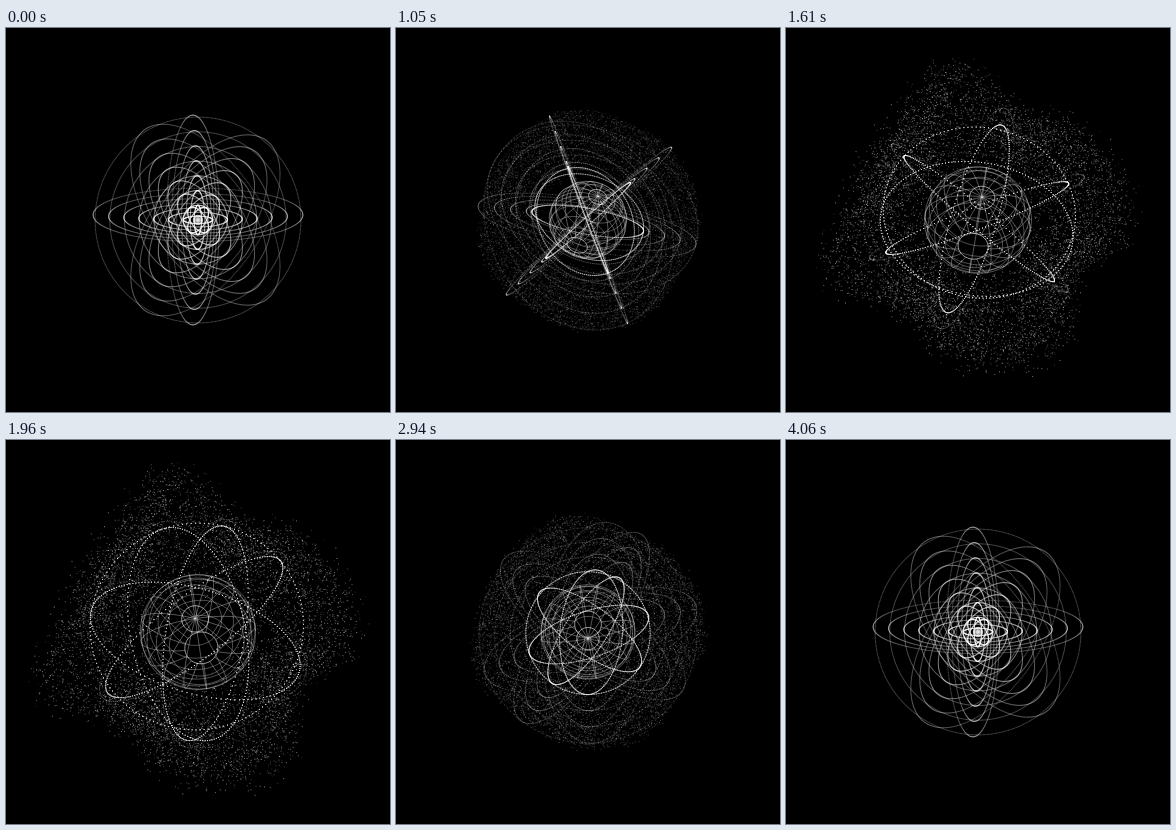
Animation, 384 px wide and 384 px high, one loop 4200 ms. Source, as an HTML page with a canvas:

```html
<!DOCTYPE html>
<html lang="en">
<head>
<meta charset="utf-8">
<title>Expanding orbits</title>
<style>
  html, body { margin: 0; width: 100%; height: 100%; background: #000; overflow: hidden; }
  canvas { display: block; width: 100vw; height: 100vh; }
</style>
</head>
<body>
<canvas id="stage" width="384" height="384"></canvas>
<script>
const ctx = document.getElementById('stage').getContext('2d');
const LOOP = 4200, STEP = 70, END = 4060;
const C = 192, CAMERA = 520, TAU = Math.PI * 2, RAD = Math.PI / 180;
const LEVELS = 7, GAP = 14.7, DOTS = 480, GLOW = .3;

// Pose keys: time, yaw, pitch, spin (degrees)
const KEYS = [
  [0, 0, 0, 360], [1050, -16, 42, 308], [1610, -5, 28, 278], [2380, 10, 0, 88],
  [2940, 0, -9, 35], [3500, 25, 0, 14], [END, 0, 0, 0]
];

// Normals of the great circles
const NORMALS = [[0, 0, 1], [0, .97, .25], [.97, 0, .25], [-.7, .5, .5], [-.7, -.5, .5]];

function ringPoints([nx, ny, nz]) {
  const flat = Math.hypot(nx, ny), len = Math.hypot(flat, nz);
  const u = flat ? [-ny / flat, nx / flat, 0] : [1, 0, 0];
  const n = [nx / len, ny / len, nz / len];
  const v = [n[1] * u[2] - n[2] * u[1], n[2] * u[0] - n[0] * u[2], n[0] * u[1] - n[1] * u[0]];
  return Array.from({ length: DOTS }, (_, i) => {
    const a = i / DOTS * TAU;
    return u.map((c, k) => c * Math.cos(a) + v[k] * Math.sin(a));
  });
}
const rings = NORMALS.map(ringPoints);

let seed = 7;
function random() {
  seed = (seed * 16807) % 2147483647;
  return seed / 2147483647;
}
const dust = Array.from({ length: 8000 }, () => {
  const angle = random() * TAU;
  const reach = 138 + 20 * Math.cos(4 * (angle + .26)) + 8 * Math.sin(7 * angle + 1);
  const u = Math.pow(random(), .62);
  return {
    angle,
    near: 45 + 58 * u,
    far: 55 + (reach - 55) * u + (random() + random() - 1) * 24,
    light: .12 + .38 * random()
  };
});

function slope(i, c) {
  if (i === 0 || i === KEYS.length - 1) return 0;
  return (KEYS[i + 1][c] - KEYS[i - 1][c]) / (KEYS[i + 1][0] - KEYS[i - 1][0]);
}

function pose(t, c) {
  let i = 0;
  while (i < KEYS.length - 2 && t > KEYS[i + 1][0]) i++;
  const a = KEYS[i], b = KEYS[i + 1], h = b[0] - a[0];
  const x = (t - a[0]) / h, y = 1 - x;
  return RAD * (a[c] * (1 + 2 * x) * y * y + b[c] * x * x * (3 - 2 * x)
    + h * x * y * (slope(i, c) * y - slope(i + 1, c) * x));
}

function makeProjector(t) {
  const [yaw, pitch, spin] = [1, 2, 3].map(c => pose(t, c));
  const ca = Math.cos(yaw), sa = Math.sin(yaw);
  const cb = Math.cos(pitch), sb = Math.sin(pitch);
  const cs = Math.cos(spin), ss = Math.sin(spin);
  return ([x, y, z], r) => {
    const x1 = x * cs - y * ss, y1 = x * ss + y * cs;
    const x2 = x1 * ca + z * sa, z2 = z * ca - x1 * sa;
    const y3 = y1 * cb + z2 * sb, z3 = z2 * cb - y1 * sb;
    const k = r * CAMERA / (CAMERA - z3 * r);
    return [C + x2 * k, C + y3 * k];
  };
}

function drawDust(s) {
  const show = Math.min(1, Math.max(0, (s - .3) / .5));
  if (!show) return;
  const spread = Math.min(1, Math.max(0, (s - .45) / .5));
  for (const d of dust) {
    const r = d.near + (d.far - d.near) * spread;
    ctx.globalAlpha = d.light * show;
    ctx.fillRect(C + r * Math.cos(d.angle), C + r * Math.sin(d.angle), 1, 1);
  }
}

function drawRings(project, s) {
  const minor = GLOW * Math.max(0, 1 - 1.3 * s);
  for (let k = 1; k <= LEVELS; k++) {
    // An expanding field pushes the inner shells outward
    const r = Math.max(k * GAP * (1 + .1 * s), 107 * s);
    for (const ring of rings) {
      for (let i = 0; i < DOTS; i++) {
        const alpha = i % 3 ? minor : GLOW;
        if (alpha < .01) continue;
        const [x, y] = project(ring[i], r);
        ctx.globalAlpha = alpha;
        ctx.fillRect(x - .5, y - .5, 1, 1);
      }
    }
  }
}

function drawSphere(project, r) {
  const at = (lat, lon) => project(
    [Math.sin(lat) * Math.cos(lon), Math.sin(lat) * Math.sin(lon), Math.cos(lat)], r);
  const curve = (n, alpha, point) => {
    ctx.globalAlpha = alpha;
    ctx.beginPath();
    for (let i = 0; i <= n; i++) ctx.lineTo(...point(i / n));
    ctx.stroke();
  };
  ctx.lineWidth = .8;
  const first = 15 * RAD;
  // The near cap stays open
  for (let i = 0; i < 16; i++) {
    curve(24, .42, q => at(first + q * (Math.PI - first), i / 16 * TAU));
  }
  for (let i = 1; i < 12; i++) {
    curve(48, i === 1 || i === 11 ? .75 : .38, q => at(i * first, q * TAU));
  }
}

function draw(now) {
  const t = Math.min(END, Math.floor(now % LOOP / STEP) * STEP);
  const wave = Math.sin(Math.PI * t / END), s = wave * wave;
  const lagged = Math.abs(Math.sin(Math.PI * (t - 105) / END));
  const project = makeProjector(t);
  ctx.globalAlpha = 1;
  ctx.fillStyle = '#000';
  ctx.fillRect(0, 0, 384, 384);
  ctx.fillStyle = ctx.strokeStyle = '#fff';
  drawDust(s);
  drawRings(project, s);
  drawSphere(project, 58 * lagged);
}

const start = performance.now();
let shown = -1;
function tick() {
  const now = performance.now() - start, step = Math.floor(now / STEP);
  if (step !== shown) {
    shown = step;
    draw(now);
  }
  requestAnimationFrame(tick);
}
tick();
</script>
</body>
</html>
```
